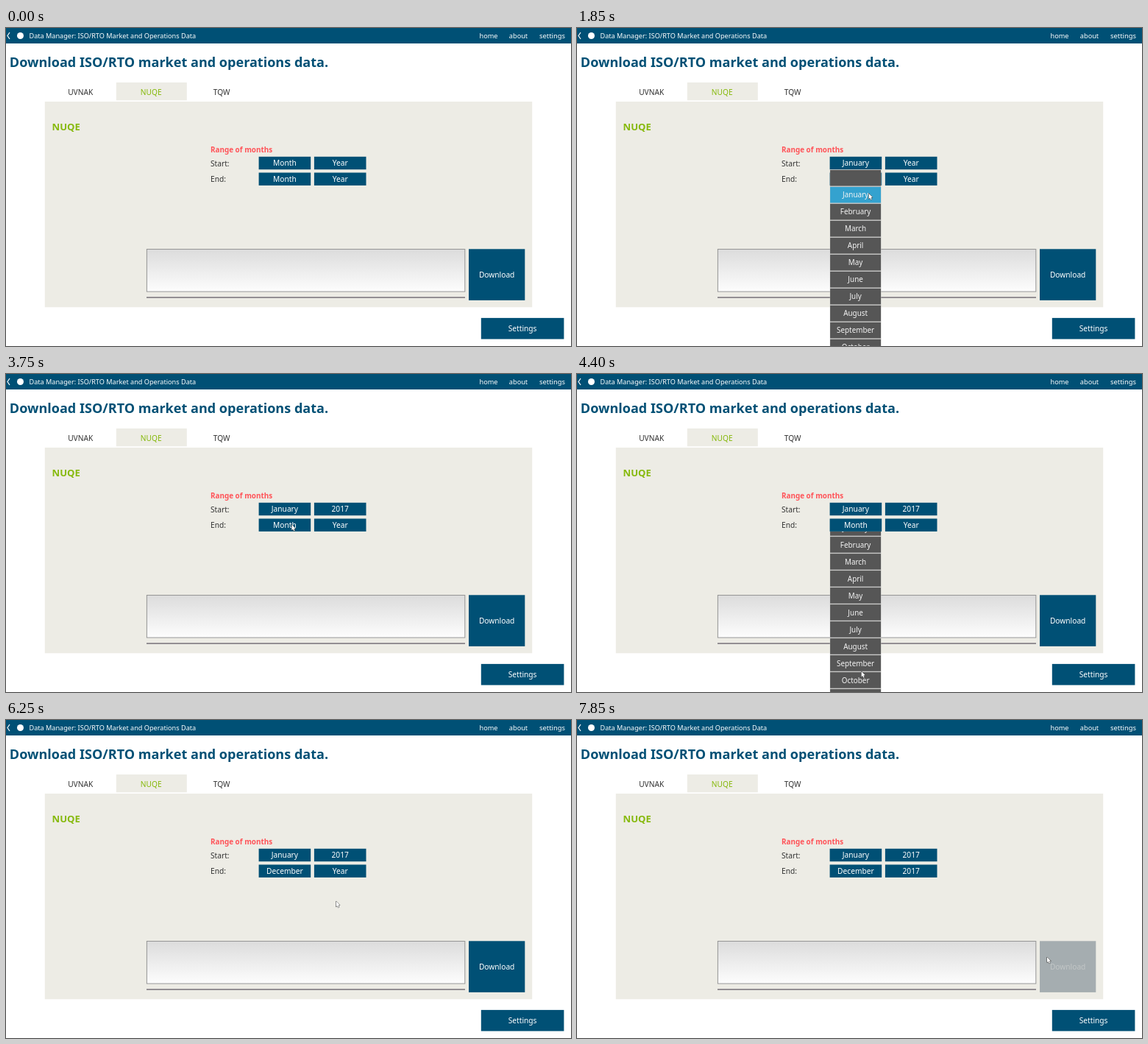
An HTML page with a canvas for the animation above (8000 ms loop, 768 by 432 pixels).

```html
<!DOCTYPE html>
<html lang="en">
<head>
<meta charset="utf-8">
<title>Data Manager</title>
<style>
  html, body { margin: 0; width: 100%; height: 100%; overflow: hidden; background: #fff; }
  canvas { display: block; width: 768px; height: 432px; }
</style>
</head>
<body>
<canvas id="stage" width="768" height="432"></canvas>
<script>
const W = 768, H = 432, LOOP = 8000, STEP = 50;
const ctx = document.getElementById('stage').getContext('2d');
const NAVY = '#005075', PANEL = '#edece5', GREEN = '#86b90c', PRESSED = '#34a2cf', INK = '#333';
const FIELD_W = 70.6, FIELD_H = 17.4, ROW_GAP = 21.7, ITEM = 23;

const month = {
  x: 343.6, empty: 'Month',
  items: ['', 'January', 'February', 'March', 'April', 'May', 'June', 'July',
    'August', 'September', 'October', 'November', 'December']
};
const year = { x: 418.9, empty: 'Year', items: ['2015', '2016', '2017', '2018'] };

// Each choice: press the field, then choose an item; aim is the pointer's offset in the column
const CHOICES = [
  { column: month, row: 0, value: 'January', press: 1550, choose: 1850, aim: 53 },
  { column: year, row: 0, value: '2017', press: 2250, choose: 3200, aim: 45 },
  { column: month, row: 1, value: 'December', press: 3850, choose: 5700, aim: 43 },
  { column: year, row: 1, value: '2017', press: 6500, choose: 7150, aim: 45 }
];
const ENTER = { time: 200, x: 556, y: 428 };
const DOWNLOAD = { x: 639, y: 322, arrive: 7650, press: 7800 };

const clamp = u => Math.min(1, Math.max(0, u));
const span = (t, from, to) => clamp((t - from) / (to - from));
const smooth = u => u * u * (3 - 2 * u);
const settle = (u, power) => 1 - (1 - u) ** power;

const fieldTop = c => 174.8 + c.row * ROW_GAP;
const listTop = c => fieldTop(c) + FIELD_H;

function scrollOf(c, t) {
  const overflow = Math.max(0, listTop(c) + c.column.items.length * ITEM - H);
  const needed = c.column.items.indexOf(c.value) * ITEM + listTop(c) > H;
  return needed ? overflow * settle(span(t, c.press + 350, c.press + 1350), 3) : 0;
}

// The pointer visits each field and then the chosen item
function pointerMoves() {
  const moves = [];
  let free = ENTER.time;
  for (const c of CHOICES) {
    const x = c.column.x + c.aim;
    const index = c.column.items.indexOf(c.value);
    const itemY = listTop(c) + (index + 0.5) * ITEM - scrollOf(c, c.choose) - 2;
    moves.push({ x, y: fieldTop(c) + 7, from: free, to: Math.min(free + 1050, c.press - 50), ease: smooth });
    moves.push({ x, y: itemY, from: c.press + 50, to: c.choose - 50, ease: u => settle(u, 8) });
    free = c.choose + 50;
  }
  moves.push({ x: DOWNLOAD.x, y: DOWNLOAD.y, from: free, to: DOWNLOAD.arrive, ease: smooth });
  return moves;
}
const MOVES = pointerMoves();

function pointerAt(t) {
  let { x, y } = ENTER;
  for (const m of MOVES) {
    const e = m.ease(span(t, m.from, m.to));
    x += (m.x - x) * e;
    y += (m.y - y) * e;
  }
  return [x, y];
}

function box(x, y, w, h, color) {
  ctx.fillStyle = color;
  ctx.fillRect(x, y, w, h);
}

function label(str, x, mid, size, color, align = 'left', weight = 400) {
  ctx.font = `${weight} ${size}px "Noto Sans", "Open Sans", sans-serif`;
  ctx.textAlign = align;
  ctx.fillStyle = color;
  ctx.fillText(str, x, mid + size * 0.35);
}

function button(str, x, y, w, h, color = NAVY, ink = '#fff') {
  box(x, y, w, h, color);
  label(str, x + w / 2, y + h / 2 + 0.4, 10.2, ink, 'center');
}

function header() {
  box(0, 0, W, 21, NAVY);
  ctx.strokeStyle = '#fff';
  ctx.lineWidth = 1.2;
  ctx.beginPath();
  ctx.moveTo(5, 6);
  ctx.lineTo(2, 10.5);
  ctx.lineTo(5, 15);
  ctx.stroke();
  ctx.fillStyle = '#fff';
  ctx.beginPath();
  ctx.arc(19.5, 10.5, 4.5, 0, 2 * Math.PI);
  ctx.fill();
  label('Data Manager: ISO/RTO Market and Operations Data', 31.5, 10.7, 9.13, '#fff');
  label('home', 656, 10.7, 9.2, '#fff', 'center');
  label('about', 696.5, 10.7, 9.2, '#fff', 'center');
  label('settings', 742.5, 10.7, 9.4, '#fff', 'center');
}

function output() {
  const shade = ctx.createLinearGradient(0, 301, 0, 358);
  shade.addColorStop(0, '#dcdcdc');
  shade.addColorStop(1, '#fdfdfd');
  box(191, 300, 433, 58.5, shade);
  ctx.strokeStyle = '#959595';
  ctx.lineWidth = 1;
  ctx.strokeRect(191.4, 300.5, 432.4, 57.6);
  box(191, 365.2, 433, 1.8, '#8a868b');
}

function page() {
  box(0, 0, W, H, '#fff');
  header();
  label('Download ISO/RTO market and operations data.', 4.8, 46.2, 18.06, NAVY, 'left', 700);
  box(149.8, 74, 96, 24.3, PANEL);
  ['UVNAK', 'NUQE', 'TQW'].forEach((name, i) =>
    label(name, 101.2 + i * 96, 87, 10.2, i === 1 ? GREEN : INK, 'center'));
  box(52.8, 100, 662.4, 279.3, PANEL);
  label('NUQE', 62.5, 134.3, 13.1, GREEN, 'left', 700);
  label('Range of months', 278, 165.5, 9.9, '#ff5358', 'left', 700);
  ['Start:', 'End:'].forEach((name, i) => label(name, 278, 184 + i * ROW_GAP, 10.2, INK));
  output();
  button('Settings', 645.8, 393.9, 112.6, 28.7);
}

function downloadButton(t) {
  const area = [629, 300.3, 76.3, 69.6];
  if (t >= DOWNLOAD.press + STEP) button('Download', ...area, '#a5adb0', '#c2c6c6');
  else button('Download', ...area, t >= DOWNLOAD.press ? PRESSED : NAVY);
}

function field(c, t) {
  const down = t >= c.press && t < c.press + STEP;
  const text = t >= c.choose ? c.value : c.column.empty;
  button(text, c.column.x, fieldTop(c), FIELD_W, FIELD_H, down ? PRESSED : NAVY);
}

function list(c, t) {
  if (t < c.press + STEP || t >= c.choose + STEP) return;
  const { x, items } = c.column;
  const top = listTop(c);
  ctx.save();
  ctx.beginPath();
  ctx.rect(x, top, 70, Math.min(items.length * ITEM, H - top));
  ctx.clip();
  box(x, top, 70, H, '#c9c9c8');
  items.forEach((name, i) => {
    const y = top + i * ITEM - scrollOf(c, t);
    const chosen = name === c.value && t >= c.choose;
    box(x + 0.5, y + 0.7, 69, ITEM - 1.4, chosen ? PRESSED : '#565656');
    label(name, x + 35, y + 11.8, 9.9, '#f4f4f4', 'center');
  });
  ctx.restore();
}

function pointer(t) {
  if (t < ENTER.time) return;
  ctx.save();
  ctx.translate(...pointerAt(t));
  const arrow = new Path2D('M0 0V7.5L1.7 6.1 2.9 8.8 4.1 8.3 3 5.6 5.2 5.4Z');
  ctx.lineWidth = 1;
  ctx.strokeStyle = '#333';
  ctx.stroke(arrow);
  ctx.fillStyle = '#fff';
  ctx.fill(arrow);
  ctx.restore();
}

function draw(t) {
  page();
  downloadButton(t);
  CHOICES.forEach(c => field(c, t));
  CHOICES.forEach(c => list(c, t));
  pointer(t);
}

const begin = performance.now();
function tick() {
  const t = (performance.now() - begin) % LOOP;
  draw(Math.floor(t / STEP) * STEP);
  requestAnimationFrame(tick);
}
tick();
</script>
</body>
</html>
```
